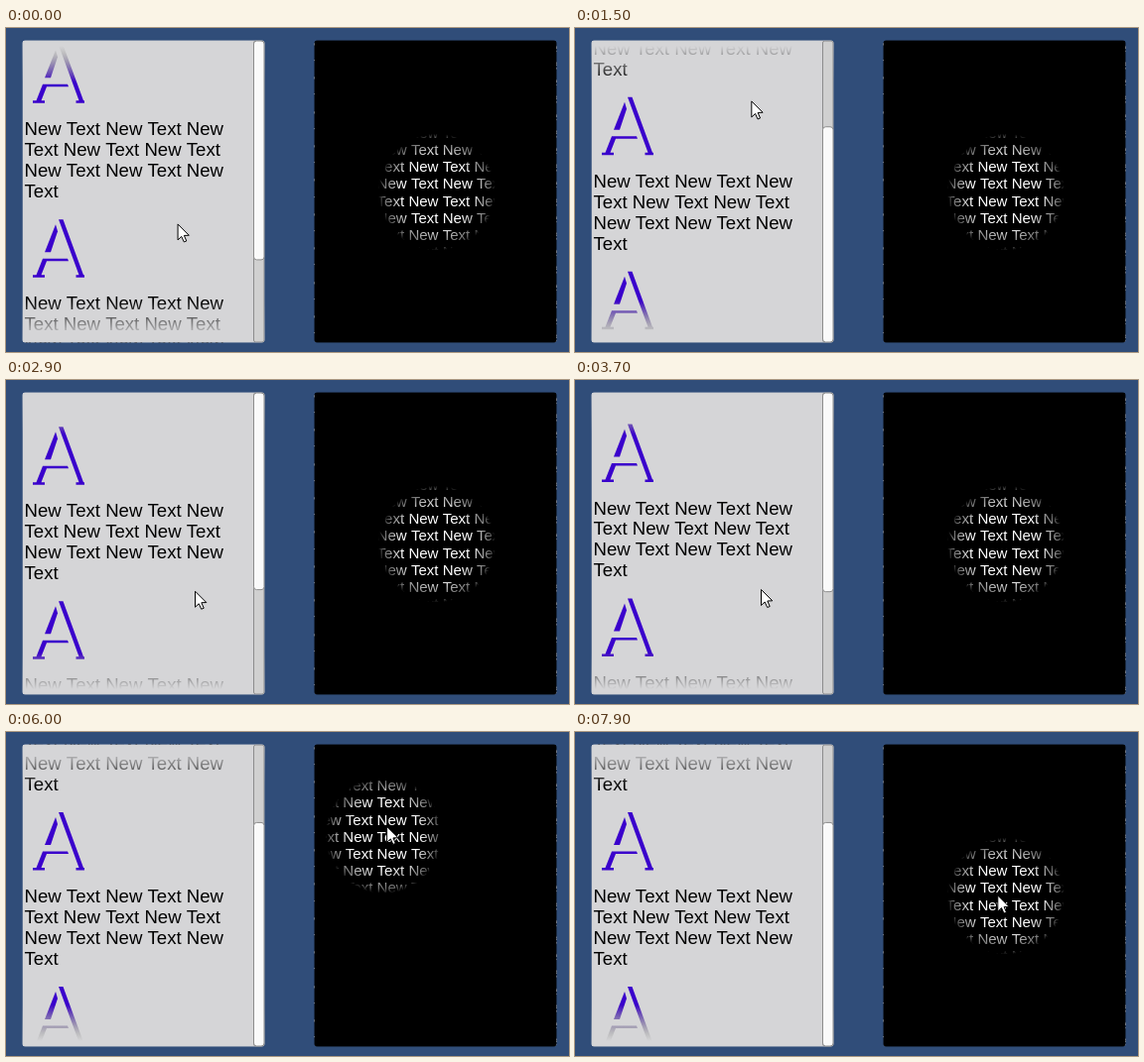
Animation of 567 by 327 pixels, one loop 8000 ms. Source, as an HTML page with a canvas:

```html
<!DOCTYPE html>
<html lang="en">
<head>
<meta charset="utf-8">
<title>Soft masks</title>
<style>
  html, body { margin: 0; width: 100%; height: 100%; overflow: hidden; background: #304d79; }
  canvas { display: block; }
</style>
</head>
<body>
<canvas id="stage" width="567" height="327"></canvas>
<script>
const ctx = document.getElementById('stage').getContext('2d');
const LOOP = 8000, STEP = 100;
const LEFT = { x: 16.5, y: 12.5, w: 244, h: 305 };
const RIGHT = { x: 310.5, y: 12.5, w: 244, h: 305 };
const CONTENT_H = 409, ITEM_H = 176, FADE = 42;
const GREY = '213,213,215';
const LINES = ['New Text New Text New', 'Text New Text New Text', 'New Text New Text New', 'Text'];

// Turning points of the drag; the pointer's y is grip minus scroll.
const DRAG = [
  { at: -600, scroll: -43, x: 172, grip: 190 },
  { at: 1300, scroll: 117, x: 174.5, grip: 193 },
  { at: 2080, scroll: 115, x: 193, grip: 174.5 },
  { at: 2950, scroll: -38, x: 190, grip: 176 },
  { at: 3700, scroll: -34, x: 187, grip: 177 },
  { at: 4400, scroll: 105.5, x: 195, grip: 172.5 }
];
const HOME = { x: 434, y: 165.5 };
const LOOP_UP = 5150, LOOP_DOWN = 6575;

const clamp = (v, lo, hi) => Math.min(Math.max(v, lo), hi);
const mix = (a, b, u) => a + (b - a) * u;
const ease = (t, from, to) => (1 - Math.cos(Math.PI * clamp((t - from) / (to - from), 0, 1))) / 2;

function drag(t, key) {
  const i = Math.max(1, DRAG.findIndex(k => k.at > t));
  const [a, b] = t >= DRAG.at(-1).at ? DRAG.slice(-2) : DRAG.slice(i - 1, i + 1);
  return mix(a[key], b[key], ease(t, a.at, b.at));
}

// A figure of eight: a tilted loop upwards, gathering speed, then one downwards.
function lens(t) {
  if (t < LOOP_DOWN) {
    const a = 2 * Math.PI * Math.max(0, (t - LOOP_UP) / (LOOP_DOWN - LOOP_UP)) ** 2;
    const rise = 1 - Math.cos(a);
    return { x: HOME.x - 31 * Math.sin(a) - 18 * rise, y: HOME.y - 38 * rise };
  }
  const a = 2 * Math.PI * (t - LOOP_DOWN) / 1325;
  return { x: HOME.x - 37 * Math.sin(a), y: HOME.y + 38 * (1 - Math.cos(a)) };
}

// From the scroll view over to the lens, which trails the pointer by 50 ms.
function pointer(t) {
  const ahead = lens(t + 50), u = ease(t, 4500, 4900);
  return {
    x: mix(drag(t, 'x'), ahead.x, u),
    y: mix(drag(t, 'grip') - drag(t, 'scroll'), ahead.y - 2, u)
  };
}

function roundBox(x, y, w, h, r) {
  ctx.beginPath();
  ctx.roundRect(x, y, w, h, r);
}

function openPanel({ x, y, w, h }, color) {
  ctx.save();
  roundBox(x, y, w, h, 3);
  ctx.clip();
  ctx.fillStyle = color;
  ctx.fillRect(x, y, w, h);
}

function poly(...p) {
  ctx.beginPath();
  for (let i = 0; i < p.length; i += 2) ctx.lineTo(p[i], p[i + 1]);
  ctx.closePath();
  ctx.fill();
}

function letterA(y) {
  ctx.save();
  ctx.translate(27, y);
  poly(26, 0, 30.5, 0, 51, 56, 52, 56, 52, 58.5, 43.5, 58.5, 43.5, 56, 46.5, 56);
  poly(23, 5, 25, 12, 18, 33, 12, 33);
  poly(10, 39.5, 35, 39.5, 36, 42, 14, 42, 8.5, 56, 12, 56, 12, 58.5, 0, 58.5, 0, 56, 3.5, 56);
  ctx.restore();
}

function gradient(y0, y1, ...stops) {
  const g = ctx.createLinearGradient(0, y0, 0, y1);
  stops.forEach(([at, color]) => g.addColorStop(at, color));
  return g;
}

function edgeFade(from, to) {
  ctx.fillStyle = gradient(from, to,
    [0, `rgba(${GREY},1)`], [.13, `rgba(${GREY},1)`], [1, `rgba(${GREY},0)`]);
  ctx.fillRect(LEFT.x, Math.min(from, to), LEFT.w, FADE);
}

function scrollbar(s) {
  const x = 249.5, w = 10.5, top = 13, view = 304, max = CONTENT_H - view;
  const over = Math.max(0, -s, s - max);
  const h = (view - over) / CONTENT_H * view;
  const y = top + clamp(s / CONTENT_H * view, 0, view - h);
  ctx.lineWidth = 1;
  ctx.strokeStyle = '#8c8c8c';
  ctx.fillStyle = '#d0d0d0';
  roundBox(x, top, w, view, 2); ctx.fill(); ctx.stroke();
  ctx.fillStyle = '#fafafa';
  roundBox(x, y, w, h, 3); ctx.fill(); ctx.stroke();
}

function scrollPanel(s) {
  const top = LEFT.y, bottom = top + LEFT.h;
  openPanel(LEFT, `rgb(${GREY})`);
  ctx.font = '18.6px "Liberation Sans", Arial, sans-serif';
  const ink = gradient(top, bottom,
    [0, '#666'], [.04, '#666'], [.14, '#3a00cc'], [.86, '#3a00cc'], [.96, '#666'], [1, '#666']);
  for (let i = 0; i < 3; i++) {
    const y = i * ITEM_H - s;
    // The ink gradient is fixed to the panel, so undo the letter's own offset.
    ctx.fillStyle = gradientFor(y + 10.5);
    letterA(y + 10.5);
    ctx.fillStyle = '#000';
    LINES.forEach((line, n) => ctx.fillText(line, 18.5, y + 101.5 + n * 20.9));
  }
  edgeFade(top, top + FADE);
  edgeFade(bottom, bottom - FADE);
  scrollbar(s);
  ctx.restore();
}

// Purple in the middle of the panel, grey where the mask thins out.
function gradientFor(y) {
  return gradient(LEFT.y - y, LEFT.y + LEFT.h - y,
    [0, '#666'], [.04, '#666'], [.14, '#3a00cc'], [.86, '#3a00cc'], [.96, '#666'], [1, '#666']);
}

function lensPanel({ x, y }) {
  openPanel(RIGHT, '#000');
  ctx.font = '15.05px "Liberation Sans", Arial, sans-serif';
  ctx.fillStyle = '#fff';
  const left = 373.6 - 2 * ctx.measureText('New Text ').width;
  for (let k = -6; k < 12; k++) {
    ctx.fillText((k % 2 ? 'Text New ' : 'New Text ').repeat(5), left, 127.9 + k * 17.2);
  }
  const g = ctx.createRadialGradient(x, y, 0, x, y, 59);
  [[0, 0], [.6, 0], [.92, .6], [1, 1]].forEach(([at, a]) => g.addColorStop(at, `rgba(0,0,0,${a})`));
  ctx.fillStyle = g;
  ctx.fillRect(RIGHT.x, RIGHT.y, RIGHT.w, RIGHT.h);
  ctx.restore();
}

function cursor({ x, y }) {
  ctx.save();
  ctx.translate(x + .5, y + .5);
  ctx.fillStyle = '#fff';
  ctx.strokeStyle = '#000';
  ctx.lineWidth = 1;
  poly(0, 0, 0, 16, 3.7, 12.5, 6.2, 18, 8.7, 17, 6.3, 11.5, 11.3, 11.3);
  ctx.stroke();
  ctx.restore();
}

function draw(t) {
  ctx.fillStyle = '#304d79';
  ctx.fillRect(0, 0, 567, 327);
  scrollPanel(drag(t, 'scroll'));
  lensPanel(lens(t));
  cursor(pointer(t));
}

const start = performance.now();
function tick() {
  const t = (performance.now() - start) % LOOP;
  draw(Math.floor(t / STEP) * STEP);
  requestAnimationFrame(tick);
}
tick();
</script>
</body>
</html>
```
